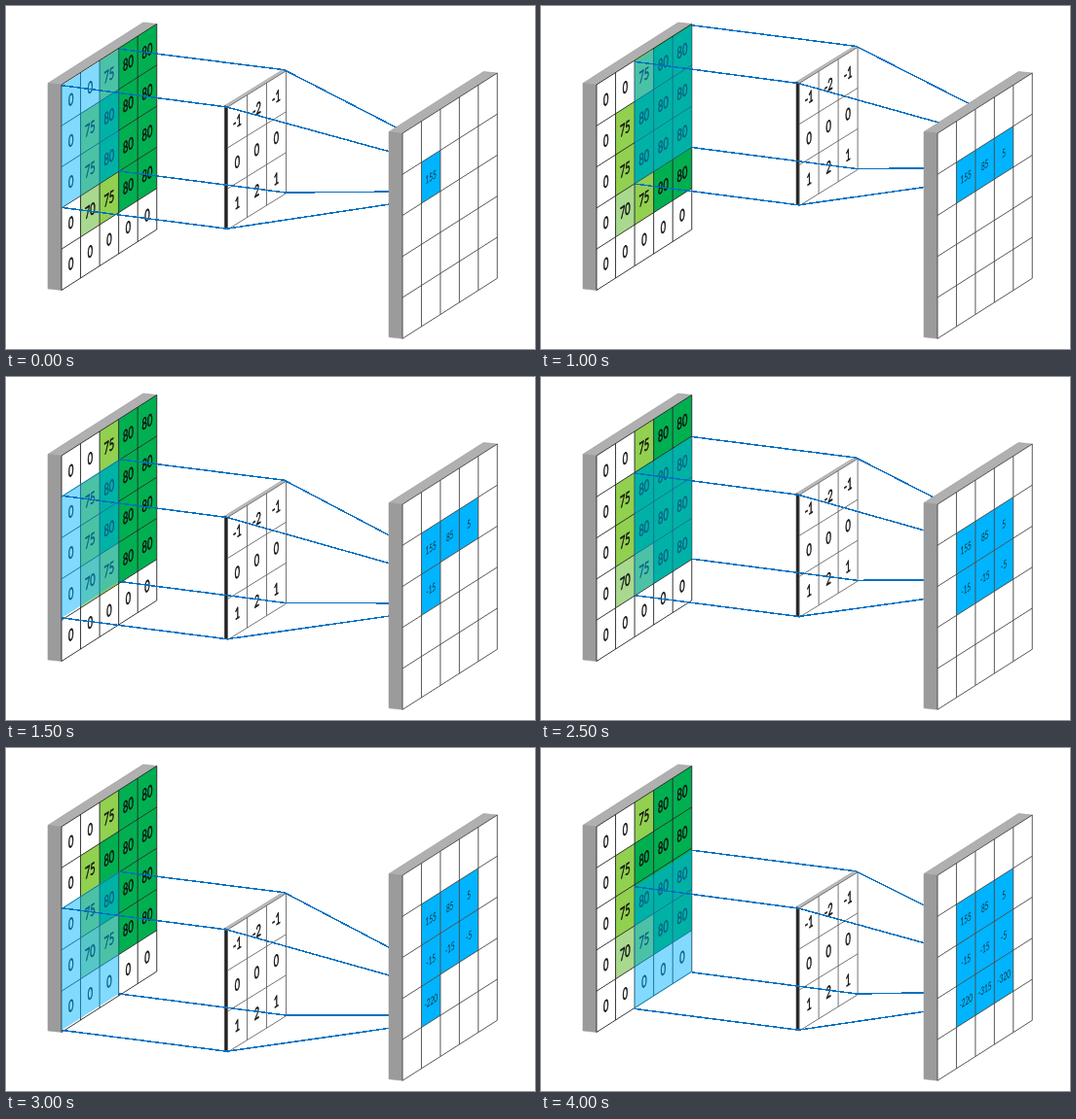
Recreate the animation shown at these times as an HTML page. Size 543 by 353 pixels, loop 4500 ms.

```html
<!DOCTYPE html>
<html lang="en">
<head>
<meta charset="utf-8">
<title>Convolution</title>
<style>
  html, body { margin: 0; width: 100%; height: 100%; overflow: hidden; background: #fff; }
  svg { display: block; width: 543px; height: 353px; }
  text { font-family: Lato, "Open Sans", sans-serif; font-size: 16.5px; text-anchor: middle; fill: #111; }
  .strong text { stroke: #111; stroke-width: .6px; }
  .result text { font-size: 11.5px; fill: #12303c; }
  .grid { fill: none; stroke: #222; stroke-width: .9px; }
  .kernel .grid { stroke: #666; }
  .result .grid { stroke: #444; }
  .ray { fill: none; stroke: #0070c0; stroke-width: 1.5px; shape-rendering: crispEdges; }
</style>
</head>
<body>
<svg id="stage" viewBox="0 0 543 353"></svg>
<script>
const STEP_MS = 500;
const SIZE = 3;
const BLUE = '#00b4ff';
const INPUT = [
  [0, 0, 75, 80, 80],
  [0, 75, 80, 80, 80],
  [0, 75, 80, 80, 80],
  [0, 70, 75, 80, 80],
  [0, 0, 0, 0, 0]
];
const KERNEL = [[-1, -2, -1], [0, 0, 0], [1, 2, 1]];
const RESULT = [[155, 85, 5], [-15, -15, -5], [-220, -315, -320]];
const FILLS = { 0: '#fff', 70: '#a9d98e', 75: '#92d050', 80: '#00b050' };
const ROW_SHIFT = [0, 40.5, 83];
const SQUEEZE = 0.56; // horizontal foreshortening of lettering on a panel

const stage = document.getElementById('stage');

function add(parent, tag, attrs = {}, content = '') {
  const node = document.createElementNS('http://www.w3.org/2000/svg', tag);
  for (const key in attrs) node.setAttribute(key, attrs[key]);
  node.textContent = content;
  return parent.appendChild(node);
}

// A panel is a sheared grid: columns go right and up, rows go straight down.
function makePanel(x, y, count, dx, rise, dy) {
  return { count, dx, rise,
    at: (col, row) => [x + col * dx, y - col * rise + row * dy] };
}

const points = list => list.map(p => p.join()).join(' ');

function quad(panel, col, row, w = 1, h = 1) {
  return points([panel.at(col, row), panel.at(col + w, row),
    panel.at(col + w, row + h), panel.at(col, row + h)]);
}

function drawSlab(parent, panel, depth, lift, side, top) {
  const n = panel.count;
  const back = ([x, y]) => [x - depth, y - lift];
  const [a, b, c] = [panel.at(0, 0), panel.at(n, 0), panel.at(0, n)];
  add(parent, 'polygon', { points: points([a, b, back(b), back(a)]), fill: top, stroke: '#999', 'stroke-width': .6 });
  add(parent, 'polygon', { points: points([a, c, back(c), back(a)]), fill: side, stroke: side, 'stroke-width': .6 });
  add(parent, 'polygon', { points: quad(panel, 0, 0, n, n), fill: '#fff' });
}

function drawGrid(parent, panel) {
  const n = panel.count;
  let d = '';
  for (let i = 0; i <= n; i++) {
    d += `M${panel.at(i, 0)}L${panel.at(i, n)}M${panel.at(0, i)}L${panel.at(n, i)}`;
  }
  add(parent, 'path', { d, class: 'grid' });
}

function drawNumber(parent, panel, col, row, value, baseline) {
  const [x, y] = panel.at(col + .5, row + .5);
  const shear = -panel.rise / panel.dx * SQUEEZE;
  add(parent, 'text', { y: baseline, transform: `matrix(${SQUEEZE} ${shear} 0 1 ${x} ${y})` }, value);
}

function eachCell(table, visit) {
  table.forEach((line, row) => line.forEach((value, col) => visit(value, col, row)));
}

const input = makePanel(57, 81, 5, 19.55, 12.5, 42.3);
const kernel = makePanel(227.5, 104, SIZE, 20, 12.4, 42);
const result = makePanel(407, 131, 5, 19.45, 12.4, 42.25);
const lens = makePanel(57, 81.7, SIZE, 19.6, 12.5, 41.9);

const inputLayer = add(stage, 'g', { class: 'strong' });
drawSlab(inputLayer, input, 14, 1.5, '#9b9b9b', '#b0b0b0');
eachCell(INPUT, (value, col, row) =>
  add(inputLayer, 'polygon', { points: quad(input, col, row), fill: FILLS[value] }));
drawGrid(inputLayer, input);
eachCell(INPUT, (value, col, row) => drawNumber(inputLayer, input, col, row, value, 6));
const highlight = add(stage, 'polygon', { points: quad(lens, 0, 0, SIZE, SIZE), fill: BLUE, opacity: .49 });

const kernelLayer = add(stage, 'g', { class: 'kernel strong' });
drawSlab(kernelLayer, kernel, 3, 1.5, '#222', '#bbb');
drawGrid(kernelLayer, kernel);
eachCell(KERNEL, (value, col, row) => drawNumber(kernelLayer, kernel, col, row, value, 5.5));

const rays = [[0, 0], [1, 0], [0, 1], [1, 1]].map(([right, low]) =>
  ({ right, low, path: add(stage, 'path', { class: 'ray' }) }));

const resultLayer = add(stage, 'g', { class: 'result' });
drawSlab(resultLayer, result, 14, 1.5, '#9b9b9b', '#b0b0b0');
const answers = [];
eachCell(RESULT, (value, col, row) => {
  const cell = add(resultLayer, 'g');
  add(cell, 'polygon', { points: quad(result, col + 1, row + 1), fill: BLUE });
  drawNumber(cell, result, col + 1, row + 1, value, 4.2);
  answers.push(cell);
});
drawGrid(resultLayer, result);

function render(step) {
  const col = step % SIZE;
  const row = Math.floor(step / SIZE);
  // The climb per column flattens slightly towards the bottom rows.
  const drop = ROW_SHIFT[row] - col * (12.2 - .6 * row);
  const lensMove = [col * 19.5, drop];
  const kernelMove = [col * 18.8, drop];
  highlight.setAttribute('transform', `translate(${lensMove})`);
  kernelLayer.setAttribute('transform', `translate(${kernelMove})`);

  for (const { right, low, path } of rays) {
    const start = lens.at(right * SIZE, low * SIZE).map((v, i) => v + lensMove[i]);
    const [kx, ky] = kernel.at(right * SIZE, low * SIZE);
    const lift = right && !low ? 1 : 0;
    const middle = [kx - .7 - lift + kernelMove[0], ky - lift - low * .8 + kernelMove[1]];
    const end = result.at(col + 1 + right, row + 1 + low);
    if (!right) end[1] += low ? col - 4 : col - 2;
    path.setAttribute('d', `M${start}L${middle}L${end}`);
  }
  answers.forEach((cell, i) => cell.setAttribute('visibility', i <= step ? 'visible' : 'hidden'));
}

const startTime = performance.now();
let shown = -1;
function tick() {
  const step = Math.floor((performance.now() - startTime) / STEP_MS) % (SIZE * SIZE);
  if (step !== shown) render(shown = step);
  requestAnimationFrame(tick);
}
tick();
</script>
</body>
</html>
```
